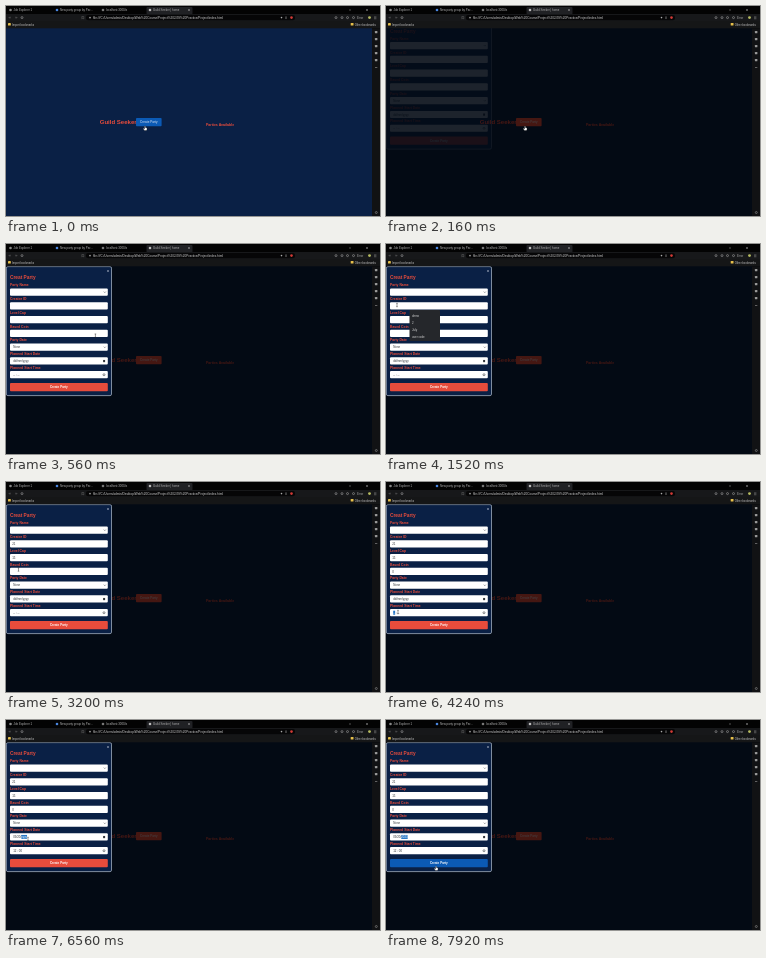
An HTML page for the animation above (8000 ms loop, 374x210 px).

```html
<!DOCTYPE html>
<html lang="en">
<head>
<meta charset="utf-8">
<title>Create party form</title>
<style>
  html, body { margin: 0; width: 100%; height: 100%; overflow: hidden; background: #000; }
  svg { display: block; width: 100vw; height: 100vh; }
  text { font-family: "Liberation Sans", Arial, sans-serif; white-space: pre; }
</style>
</head>
<body>
<svg id="stage" viewBox="0 0 374 210"></svg>
<script>
const LOOP = 8000, STEP = 80;
const RED = '#e74c3c', BLUE = '#0b5ab5', NAVY = '#0a2045', INK = '#30343a';
const stage = document.getElementById('stage');

function add(parent, tag, attrs, content) {
  const node = document.createElementNS('http://www.w3.org/2000/svg', tag);
  for (const key in attrs) node.setAttribute(key, attrs[key]);
  if (content) node.textContent = content;
  return parent.appendChild(node);
}
const group = (parent, attrs = {}) => add(parent, 'g', attrs);
const rect = (parent, x, y, width, height, fill, rx = 0) =>
  add(parent, 'rect', { x, y, width, height, fill, rx });
const dot = (parent, cx, cy, r, fill) => add(parent, 'circle', { cx, cy, r, fill });
const ring = (parent, cx, cy, stroke) =>
  add(parent, 'circle', { cx, cy, r: 1, stroke, fill: 'none', 'stroke-width': 0.55 });
const line = (parent, d, stroke, width = 0.5) =>
  add(parent, 'path', { d, stroke, fill: 'none', 'stroke-width': width });
const label = (parent, x, y, size, fill, content, weight = 400, anchor = 'start') =>
  add(parent, 'text', { x, y, 'font-size': size, fill, 'font-weight': weight, 'text-anchor': anchor }, content);
const show = (node, visible) => node.setAttribute('display', visible ? 'inline' : 'none');

// Page behind the dialog
const clip = add(add(stage, 'defs', {}), 'clipPath', { id: 'page' });
rect(clip, 0, 22, 366, 188, '#fff');
const page = group(stage, { 'clip-path': 'url(#page)' });
rect(page, 0, 22, 366, 188, NAVY);
label(page, 93.7, 118.4, 6.05, RED, 'Guild Seeker', 700);
const openButton = rect(page, 130, 112, 25.6, 8.2, BLUE, 0.8);
label(page, 142.8, 117.2, 3.1, '#dfe6f2', 'Create Party', 400, 'middle');
label(page, 200, 120.2, 3.55, RED, 'Parties Available', 700);
const shade = rect(page, 0, 22, 366, 188, 'rgba(0,0,0,.7)');

// Dialog
const dialog = group(page);
const frame = rect(dialog, 0.4, 22.6, 105.1, 129, NAVY, 1.5);
frame.setAttribute('stroke', '#b4c0d2');
frame.setAttribute('stroke-width', 0.7);
label(dialog, 4, 35, 4.8, RED, 'Creat Party', 700);
line(dialog, 'M101 26l2 2m0-2l-2 2', '#c5ccd8', 0.45);

const fieldNames = ['Party Name', 'Creator ID', 'Level Cap', 'Based Coin', 'Party Date',
  'Planned Start Date', 'Planned Start Time'];
const rowY = i => 44.5 + i * 13.77;
const fields = fieldNames.map((name, i) => {
  const y = rowY(i), x = i < 4 ? 6.2 : 7.2;
  label(dialog, 4, y - 2.2, 3.4, RED, name, 700);
  rect(dialog, 4, y, 97.8, 7.2, '#fff', 1);
  const mark = rect(dialog, x, y + 1.6, 0, 4, '#2476c7');
  const value = label(dialog, x, y + 4.7, 2.9, INK);
  const parts = [INK, '#fff', INK].map(fill => add(value, 'tspan', { fill }));
  return { x, mark, parts };
});
for (const i of [0, 4]) line(dialog, `M97.8 ${rowY(i) + 3.1}l1 1l1-1`, INK, 0.5);
rect(dialog, 97.1, rowY(5) + 2.6, 2, 2.2, INK);
ring(dialog, 98, rowY(6) + 3.6, INK);
const submit = rect(dialog, 4, 139, 97.8, 8.2, RED, 1);
label(dialog, 52.8, 144.3, 3, '#fff', 'Create Party', 700, 'middle');

// Autocomplete list
const popup = group(page);
rect(popup, 23.5, 66, 30.5, 31, '#25272b', 0.7);
[['demo', 72.6], ['2', 79.6], ['July', 87], ['user code', 93.6]].forEach(([entry, y]) =>
  label(popup, 26, y, 2.9, '#d8d8d8', entry));

// Browser frame
const chrome = group(stage);
rect(chrome, 0, 0, 374, 8, '#030303');
rect(chrome, 140.5, 1, 46, 7.2, '#202124', 1);
rect(chrome, 0, 8, 374, 7, '#17181a');
rect(chrome, 80, 8.9, 209, 5.4, '#060607', 2);
rect(chrome, 0, 15, 374, 7.3, '#151617');
rect(chrome, 366, 22.3, 8, 188, '#111214');
[[4.5, '#888', 'Job Explorer 1'], [51, '#4a86e0', 'New party group by Par...'],
 [97, '#777', 'localhost:3000/a'], [144, '#bbb', 'Guild Seeker | home']].forEach(([x, color, title]) => {
  dot(chrome, x, 4, 1.3, color);
  label(chrome, x + 3, 5.1, 2.9, '#b4b4b4', title);
});
line(chrome, 'M182 3l2 2m0-2l-2 2M360 3l2 2m0-2l-2 2M343 4h2', '#c8c8c8', 0.4);
line(chrome, 'M5 11.6H3l1-1m-1 1l1 1M9 11.6h2l-1-1m1 1l-1 1M75.8 10.5h2v2.4l-1-.7l-1 .7z', '#777', 0.4);
for (const x of [16, 330, 336, 341.5, 347.5]) ring(chrome, x, 11.6, '#aaa');
dot(chrome, 84, 11.6, 0.9, '#999');
label(chrome, 87, 12.8, 3.1, '#d0d0d0',
  'file:///C:/Users/admin/Desktop/Web%20Course/Project%202/JS%20Practice/Project/index.html');
dot(chrome, 275.5, 11.6, 0.8, '#aaa');
line(chrome, 'M280 10.4v2.6', '#bbb', 0.6);
dot(chrome, 285.5, 11.6, 1.3, '#d33b36');
label(chrome, 351, 12.6, 2.8, '#aaa', 'Error');
dot(chrome, 363.5, 11.6, 1.4, '#b9bd61');
line(chrome, 'M368 10.8h2.4m-2.4 1h2.4m-2.4 1h2.4', '#aaa', 0.35);
[[2, 'Import bookmarks'], [344.7, 'Other bookmarks']].forEach(([x, title]) => {
  rect(chrome, x, 17, 2.8, 2.6, '#e6bf4b', 0.4);
  label(chrome, x + 4, 19.5, 2.75, '#c4c4c4', title);
});
for (const y of [26, 33, 40, 47, 54])
  rect(chrome, 368.9, y - 1, 2.5, 2.3, '#9a9a9a', 0.6);
line(chrome, 'M369 61.5h2.3', '#999', 0.6);
ring(chrome, 370.3, 206.5, '#999');

// Pointer shapes, each with its hot spot at 0,0
const pointer = group(stage);
const outlined = { fill: '#fff', stroke: '#111', 'stroke-width': 0.3 };
const shapes = {
  arrow: add(pointer, 'path', { d: 'M0 0v3.6l.9-.8l.6 1.3l.6-.3l-.6-1.2h1.2z', ...outlined }),
  hand: add(pointer, 'path', { d: 'M-.4 0h.8v1.5l1.6.4v1.6l-.6 1h-2l-1.2-1.8l.4-.4l1 .6z', ...outlined }),
  beam: line(pointer, 'M-.8-1.7h1.6M0-1.7v3.4M-.8 1.7h1.6', '#222', 0.45)
};

// time, x, y
const route = [[0, 139, 120], [320, 139, 120], [880, 13, 48], [1200, 13, 48], [1440, 11, 61],
  [2000, 11, 61], [2480, 12, 75], [2880, 12, 75], [3150, 12.5, 87.5], [3700, 12.5, 87.5],
  [4100, 12, 130], [4640, 12, 130], [5200, 11.5, 121.8], [5440, 9, 117], [5760, 9, 117],
  [6400, 22, 119], [6640, 22, 119], [7360, 50, 146], [LOOP, 50, 146]];

const clamp = v => Math.min(1, Math.max(0, v));
const smooth = v => v * v * (3 - 2 * v);
function pointerAt(t) {
  const i = route.findIndex(stop => stop[0] > t);
  const [t0, x0, y0] = route[i - 1], [t1, x1, y1] = route[i];
  const k = smooth((t - t0) / (t1 - t0));
  return [x0 + (x1 - x0) * k, y0 + (y1 - y0) * k];
}
const typed = (word, t, start, gap = 160) =>
  word.slice(0, Math.max(0, Math.floor((t - start) / gap) + 1));

// Shows the pieces joined up, with the selected one highlighted
function fill(i, pieces, selected = -1) {
  const { x, mark, parts } = fields[i];
  const cut = selected < 0 ? pieces.length : selected;
  const texts = [pieces.slice(0, cut), pieces.slice(cut, cut + 1), pieces.slice(cut + 1)];
  texts.forEach((text, n) => { parts[n].textContent = text.join(''); });
  show(mark, selected >= 0);
  if (selected < 0) return;
  mark.setAttribute('x', x + parts[0].getComputedTextLength());
  mark.setAttribute('width', parts[1].getComputedTextLength());
}

function draw(t) {
  const opened = t >= 80;
  const k = clamp((t - 120) / 400);
  show(shade, opened);
  openButton.setAttribute('fill', opened ? RED : BLUE);
  dialog.setAttribute('opacity', k);
  dialog.setAttribute('transform', `translate(0 ${-9.4 * (1 - k)})`);
  show(popup, t >= 1440 && t < 1920);

  fill(1, [typed('21', t, 1760)]);
  fill(2, [typed('15', t, 2640)]);
  fill(3, [typed('0', t, 3440)]);
  fill(4, ['None']);
  const day = t < 5760 ? 'dd' : '09', month = t < 6240 ? 'mm' : '20';
  const year = t < 6880 ? 'yyyy' : typed('2023', t, 6880, 80);
  fill(5, [day, '/', month, '/', year], t < 5440 ? -1 : t < 5760 ? 0 : t < 6240 ? 2 : 4);
  const hour = t < 4560 ? '--' : '12', minute = t < 5280 ? '--' : '00';
  fill(6, [hour, ' : ', minute], t < 4160 || t >= 5440 ? -1 : t < 4640 ? 0 : 2);

  const [x, y] = pointerAt(t);
  const overSubmit = y > 139 && t > 6640;
  submit.setAttribute('fill', overSubmit ? BLUE : RED);
  const overField = x < 102 && fieldNames.some((_, i) => y >= rowY(i) && y <= rowY(i) + 7.2);
  const kind = t < 400 || overSubmit ? 'hand' : overField ? 'beam' : 'arrow';
  for (const name in shapes) show(shapes[name], name === kind);
  pointer.setAttribute('transform', `translate(${x} ${y})`);
}

fields.forEach(field => show(field.mark, false));
const start = performance.now();
function tick() {
  const t = (performance.now() - start) % LOOP;
  draw(Math.floor(t / STEP) * STEP);
  requestAnimationFrame(tick);
}
tick();
</script>
</body>
</html>
```
